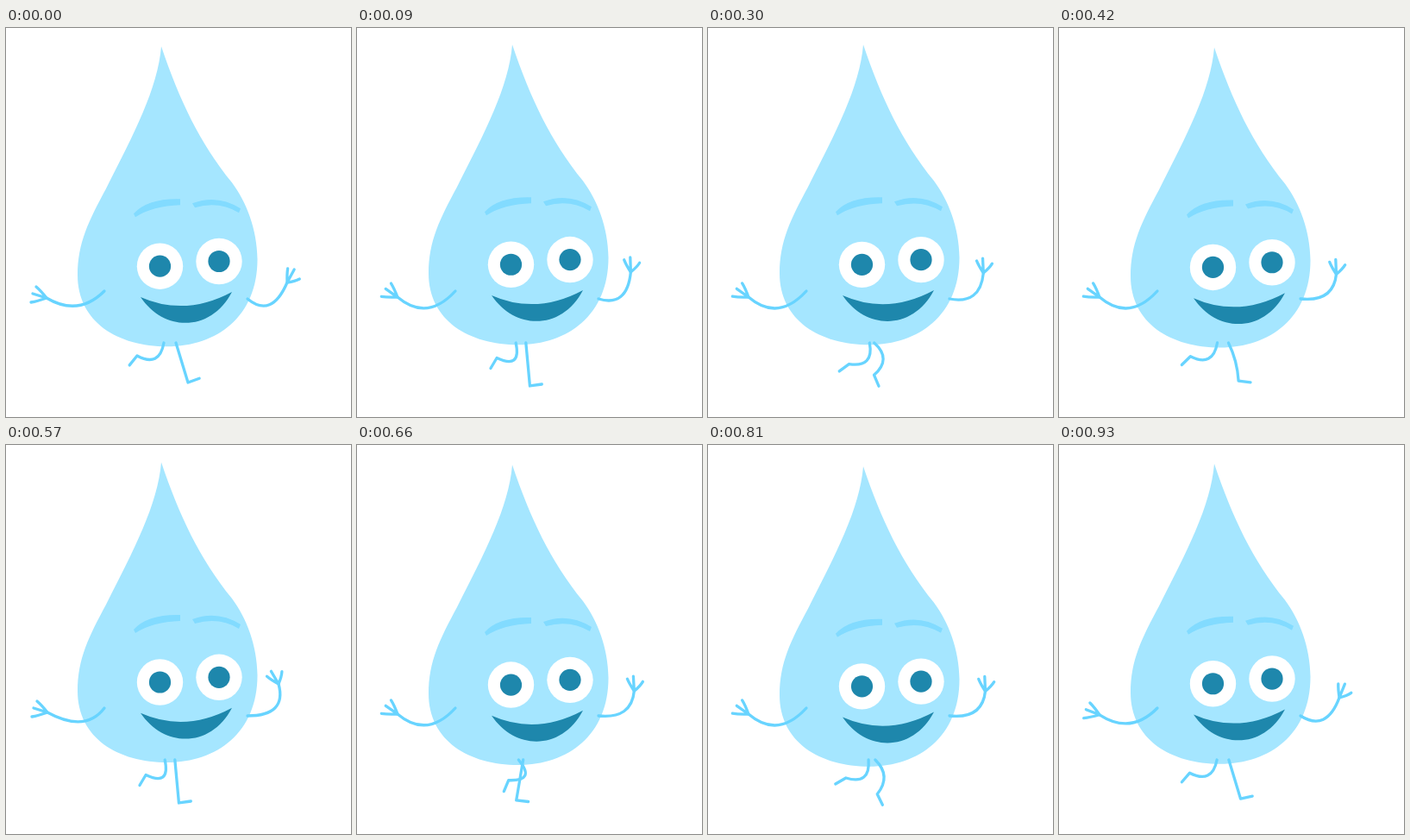
Recreate the animation shown at these times as an HTML page with a canvas. Size 400x451 px, loop 960 ms.

```html
<!DOCTYPE html>
<html lang="en">
<head>
<meta charset="utf-8">
<title>Walking water drop</title>
<style>
  html, body { margin: 0; height: 100%; overflow: hidden; background: #fff; }
  canvas { display: block; }
</style>
</head>
<body>
<canvas id="stage" width="400" height="451"></canvas>
<script>
const ctx = document.getElementById('stage').getContext('2d');
const LOOP = 960, STEP = 30;
const LIMB = '#68d4ff', DARK = '#1e87ac';

const body = new Path2D('M180 21C176 70 148 123 116 186C96 223 83 249 83 286C83 341 130 369 187 369C245 369 291.5 334 291.5 268C291 233 279 202 262 179C224 132 201 83 180 21Z');
const brows = new Path2D('M202 198Q164 197 148 215L150 219Q170 206 202 205ZM216 203Q245 192 272 209L270 214Q247 200 219 208Z');
const mouth = new Path2D('M156 311.7Q208 334.7 262 305.7C238 352 184 353 156 311.7Z');

// Evenly timed points of one stride, starting as the heel lands
const ankleX = [211, 188, 161, 152, 173, 195];
const ankleY = [411, 414, 387, 380, 387, 404];
const footAngle = [-20, 0, 150, 129, 115, 65];

// Poses hold elbow control x, y, wrist x, y and hand angle;
// the arm leaves its rest pose for each gesture and returns
const leftArm = {
  shoulder: [114, 305],
  fingers: [[-12, -13], [-16, -5], [-18, 5]],
  rest: [81, 341, 47, 312, 18],
  gestures: [
    { at: 0, width: 100, pose: [84, 335, 47, 313, 0] },
    { at: 570, width: 100, pose: [92, 334, 48, 310, 0] }
  ]
};
const rightArm = {
  shoulder: [280, 314],
  fingers: [[-8, -14], [-1, -17], [10, -11]],
  rest: [318, 318, 321.5, 285.5, 1],
  gestures: [
    { at: 0, width: 100, pose: [308, 337, 326, 295, 32] },
    { at: 180, width: 180, pose: [309, 329, 313, 280, 0] },
    { at: 570, width: 100, pose: [326, 314, 316, 277, -27] }
  ]
};

const radians = degrees => degrees * Math.PI / 180;
const ease = u => u * u * (3 - 2 * u);

// Looping cubic through evenly timed values; flow 0 rests at each one
function cycle(values, time, flow) {
  const n = values.length, pos = (time % LOOP) / LOOP * n;
  const i = Math.floor(pos), u = pos - i;
  const [p, a, b, q] = [-1, 0, 1, 2].map(k => values[(i + k + n) % n]);
  return a + (b - a) * ease(u) +
    flow * u * (1 - u) * ((1 - u) * (b - p) - u * (q - a));
}

function pulse(time, at, width) {
  const gap = Math.abs(time - at);
  return ease(Math.max(0, 1 - Math.min(gap, LOOP - gap) / width));
}

function fill(path, color) {
  ctx.fillStyle = color;
  ctx.fill(path);
}

function disc(x, y, r, color) {
  const path = new Path2D();
  path.arc(x, y, r, 0, 2 * Math.PI);
  fill(path, color);
}

function drawLeg(time) {
  const hipX = 190 + 7 * Math.cos(2 * Math.PI * time / LOOP), hipY = 365;
  const x = cycle(ankleX, time, 0.5), y = cycle(ankleY, time, 0.5);
  const foot = radians(cycle(footAngle, time, 0));
  // The shorter the leg, the further the knee bends forward
  const dx = x - hipX, dy = y - hipY, reach = Math.hypot(dx, dy);
  const bend = 0.78 * Math.sqrt(Math.max(0, 46 ** 2 - reach ** 2)) / reach;
  ctx.beginPath();
  ctx.moveTo(hipX, hipY);
  ctx.quadraticCurveTo(hipX + dx / 2 + dy * bend, hipY + dy / 2 - dx * bend, x, y);
  ctx.lineTo(x + 14 * Math.cos(foot), y + 14 * Math.sin(foot));
  ctx.stroke();
}

function drawArm({ shoulder, fingers, rest, gestures }, time) {
  const [ex, ey, wx, wy, angle] = rest.map((value, i) => gestures.reduce(
    (sum, { at, width, pose }) => sum + (pose[i] - value) * pulse(time, at, width), value));
  ctx.beginPath();
  ctx.moveTo(...shoulder);
  ctx.quadraticCurveTo(ex, ey, wx, wy);
  ctx.stroke();
  ctx.save();
  ctx.translate(wx, wy);
  ctx.rotate(radians(angle));
  ctx.beginPath();
  const [mx, my] = fingers[1];
  for (const [x, y] of fingers) {
    ctx.moveTo(0, 0);
    ctx.quadraticCurveTo(x * 0.7 - mx * 0.1, y * 0.7 - my * 0.1, x, y);
  }
  ctx.stroke();
  ctx.restore();
}

function draw(time) {
  ctx.fillStyle = '#fff';
  ctx.fillRect(0, 0, 400, 451);

  const turn = 2 * Math.PI * time / LOOP;
  ctx.save();
  ctx.translate(0, 0.2 - 2.8 * Math.sin(turn) - 1.7 * Math.sin(2 * turn) + 1.2 * Math.sin(3 * turn));
  fill(body, '#a5e6ff');
  fill(brows, '#82dbff');
  for (const [x, y] of [[178.5, 276], [247, 270.3]]) {
    disc(x, y, 26.7, '#fff');
    disc(x, y, 12.6, DARK);
  }
  fill(mouth, DARK);
  ctx.restore();

  ctx.strokeStyle = LIMB;
  ctx.lineWidth = 3.3;
  ctx.lineCap = ctx.lineJoin = 'round';
  drawLeg(time);
  drawLeg(time + LOOP / 2);
  drawArm(leftArm, time);
  drawArm(rightArm, time);
}

const start = performance.now();
function tick() {
  const elapsed = (performance.now() - start) % LOOP;
  draw(Math.floor(elapsed / STEP) * STEP);
  requestAnimationFrame(tick);
}
tick();
</script>
</body>
</html>
```
